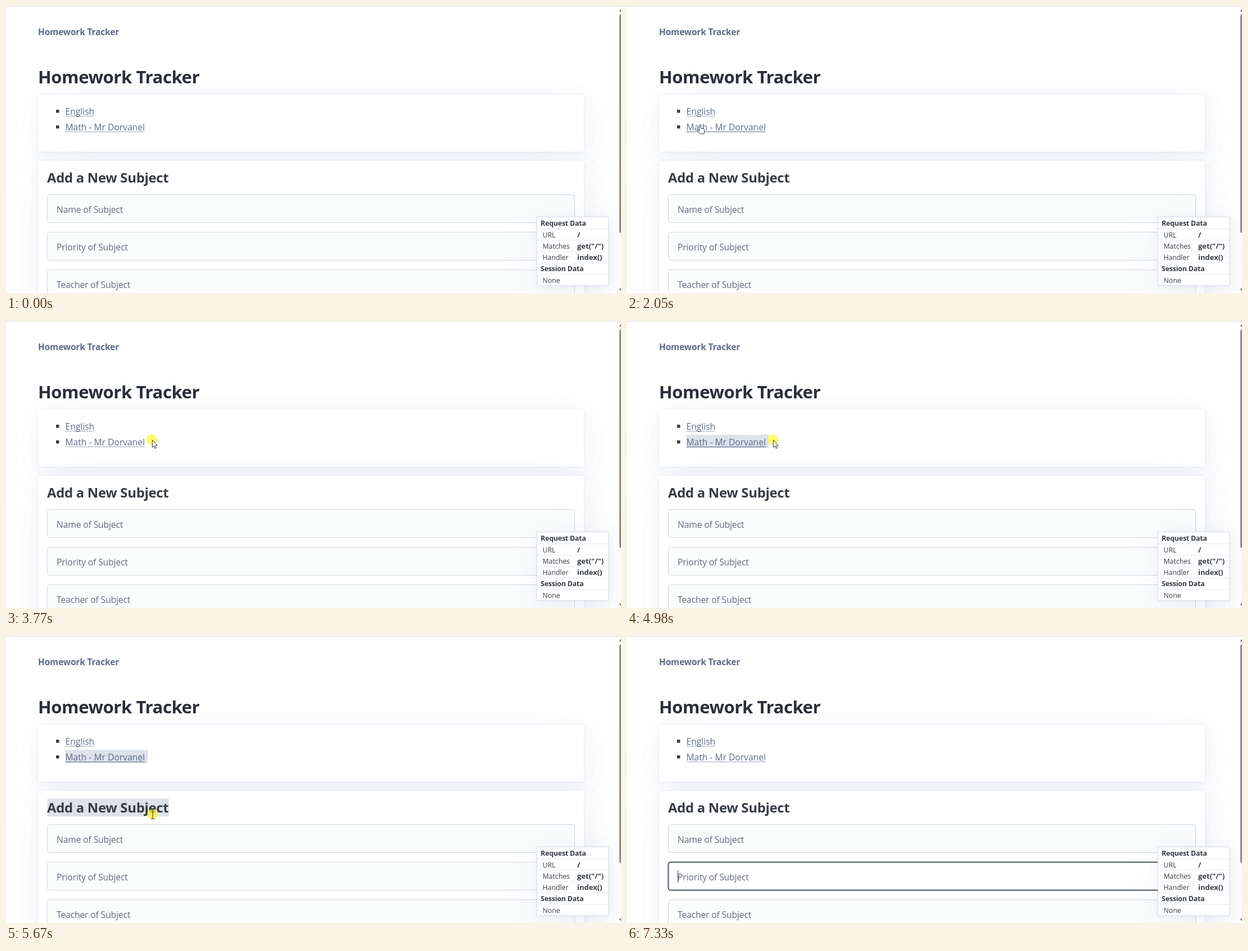
An HTML page for the animation above (7730 ms loop, 1094 by 512 pixels).

```html
<!DOCTYPE html>
<html lang="en">
<head>
<meta charset="utf-8">
<title>Homework Tracker</title>
<style>
html, body { margin: 0; width: 100%; height: 100%; overflow: hidden; background: #fff; }
body { position: relative; }
svg, .card { position: absolute; }
svg { left: 0; top: 0; font-family: "Open Sans", "Noto Sans", sans-serif; fill: #373c44; }
.card { background: #fff; border-radius: 4px; }
.panel { border-radius: 0; box-sizing: border-box; border: 1px solid #dfe3eb; }
.nav { font-size: 15.5px; font-weight: 700; letter-spacing: -.011em; fill: #5d6b89; }
.h1 { font-size: 31px; font-weight: 700; letter-spacing: -.013em; fill: #2a2e39; }
.h2 { font-size: 23.8px; font-weight: 700; letter-spacing: -.01em; }
.link { font-size: 15.6px; fill: #5d6b89; }
.hint { font-size: 15.7px; letter-spacing: -.01em; fill: #646b79; }
.head { font-size: 12.4px; font-weight: 700; letter-spacing: -.015em; }
.key { font-size: 12.3px; }
.val { font-size: 13px; font-weight: 700; }
.field { fill: #fbfcfc; stroke: #cfd5e2; }
.field.focused { fill: #fff; stroke: #48536b; stroke-width: 2; }
.sel { fill: #dde2eb; }
.rule { stroke: #5d6b89; stroke-width: 1.2; }
.row { stroke: #e7eaf0; }
</style>
</head>
<body>
<div class="card" style="left:57px;top:158px;width:971px;height:102px"></div>
<div class="card" style="left:57px;top:276px;width:971px;height:420px"></div>
<svg id="page" width="1094" height="512"></svg>
<div class="card panel" style="left:944px;top:376px;width:128px;height:123px"></div>
<svg id="overlay" width="1094" height="512"></svg>
<script>
const LOOP = 7730, STEP = 70;
const page = document.getElementById('page'), overlay = document.getElementById('overlay');

function add(parent, tag, attrs, text) {
  const el = document.createElementNS('http://www.w3.org/2000/svg', tag);
  for (const name in attrs) el.setAttribute(name, attrs[name]);
  if (text) el.textContent = text;
  parent.appendChild(el);
  return el;
}
const rect = (parent, x, y, width, height, more) =>
  add(parent, 'rect', { x, y, width, height, ...more });
const label = (parent, cls, x, y, text) => add(parent, 'text', { class: cls, x, y }, text);
const line = (parent, x1, x2, y, cls) => add(parent, 'line', { x1, x2, y1: y, y2: y, class: cls });
const show = (el, on) => el.setAttribute('display', on ? 'inline' : 'none');

// Soft shadow: each layer is twice as wide as the one before
const shadow = Array.from({ length: 6 }, (_, i) => {
  const d = 2 ** i / 4;
  return `${d}px ${2 * d}px ${12 * d}px rgba(129,145,181,${.018 + .007 * i})`;
}).concat('0 0 0 1px rgba(129,145,181,.05)').join();
for (const card of document.querySelectorAll('.card')) card.style.boxShadow = shadow;

// Areas that can be selected or hovered
const area = (x, y, w, h) => ({ x, y, w, h });
const areas = {
  title: area(57, 103, 296, 44),
  english: area(105.5, 175, 55.5, 24),
  math: area(105.5, 203, 146.5, 24),
  heading: area(73.5, 290, 216, 32)
};
const fieldAreas = [0, 1, 2].map(i => area(73.5, 336.5 + 67 * i, 938, 50));
const inside = (a, x, y) => x >= a.x && x <= a.x + a.w && y >= a.y && y <= a.y + a.h;

// Page content
rect(page, 0, 0, 1094, 1, { fill: '#dedede' });
const selection = {};
for (const name in areas) {
  const { x, y, w, h } = areas[name];
  selection[name] = rect(page, x, y, w, h, { class: 'sel' });
}
label(page, 'nav', 57, 52, 'Homework Tracker');
label(page, 'h1', 57, 138, 'Homework Tracker');
function link({ x, y, w }, text) {
  rect(page, 89, y + 10, 5.5, 5.5);
  label(page, 'link', x, y + 18.5, text);
  return line(page, x, x + w - 5, y + 21.5, 'rule');
}
const rules = {
  english: link(areas.english, 'English'),
  math: link(areas.math, 'Math - Mr Dorvanel')
};
label(page, 'h2', 73, 315, 'Add a New Subject');
const fields = ['Name', 'Priority', 'Teacher'].map((name, i) => {
  const { x, y, w, h } = fieldAreas[i];
  const box = rect(page, x, y, w, h, { class: 'field', rx: 4 });
  label(page, 'hint', 90, y + 32, name + ' of Subject');
  return box;
});
const caret = rect(page, 90, 418, 1, 22);

// Request panel
[['Request Data'], ['URL', '/'], ['Matches', 'get("/")'], ['Handler', 'index()'],
 ['Session Data'], ['None', '']].forEach(([key, val], i) => {
  const y = 377.3 + i * 20.25, isHead = val === undefined;
  if (i) line(overlay, 945, 1071, y, 'row');
  label(overlay, isHead ? 'head' : 'key', isHead ? 951 : 954.5, y + 15, key);
  if (val) label(overlay, 'val', 1016, y + 15, val);
});

// Scrollbar
rect(overlay, 1091, 15, 8, 390, { rx: 3, fill: '#8b8b8b' });
add(overlay, 'path', { d: 'M1090 10L1095 4V10ZM1090 504H1095V510Z', fill: '#858585' });

// Pointer
const pointer = add(overlay, 'g', {});
const halo = add(pointer, 'circle', { r: 9.5, fill: '#fff52a', 'fill-opacity': .7 });
const shape = (d, fill) => add(pointer, 'path',
  { d, fill, stroke: '#222', 'stroke-width': .9, 'stroke-linejoin': 'round' });
const cursors = {
  arrow: shape('M.3 .3V13.6L3.2 10.9 5.2 15.4 7.2 14.5 5.3 10.2H9.2Z', '#fff'),
  hand: shape('M-1.2 1Q0 -.6 1.2 1V6L7 7.4Q8.4 8 8 10L7 16H0L-4.5 10.5Q-4.8 8.4-1.2 10.4Z', '#fff'),
  beam: shape('M-3 -8H3M0 -8V8M-3 8H3', 'none')
};

// The pointer's trip: each glide goes on from where the last one ended
const APPEAR = 320, LEAVE = 7060, DRAG = 4980, RELEASE = 5740, FOCUS = 6250;
const clicks = [3700, 3970, 4710, 6220], PRESS = 200;
const trip = [];
let last = [952, 446];
function glide(start, end, to, bend) {
  const from = last;
  trip.push({ start, end, from, to, bend: bend || to.map((v, i) => (v + from[i]) / 2) });
  last = to;
}
glide(APPEAR, 680, [797, 356]);
glide(1210, 1280, [632, 264.5]);
glide(1280, 2050, [130, 212], [-170, 185]);
glide(2050, 2540, [177, 181], [125, 190]);
glide(3280, 3630, [260, 212]);
glide(5110, 5670, [261, 318]);
glide(5870, 6220, [310, 428]);
glide(6370, 6790, [1047, 414], [800, 330]);
glide(6920, 6990, [1066, 467]);

function pointerAt(t) {
  const { start, end, from, to, bend } = trip.filter(g => g.start <= t).pop() || trip[0];
  const held = Math.max(0, Math.floor((t - start) / STEP) * STEP);
  const u = Math.min(1, held / (end - start)), v = 1 - u;
  return from.map((p, i) => v * v * p + 2 * u * v * bend[i] + u * u * to[i]);
}

function cursorFor(x, y) {
  const over = a => inside(a, x, y);
  if (over(areas.english) || over(areas.math)) return 'hand';
  return over(areas.heading) || x < 944 && fieldAreas.some(over) ? 'beam' : 'arrow';
}

function render(t) {
  const [x, y] = pointerAt(t), between = (a, b) => t >= a && t < b;
  show(pointer, between(APPEAR, LEAVE));
  pointer.setAttribute('transform', `translate(${x} ${y})`);
  const kind = x > areas.math.x + areas.math.w || y < areas.math.y && x > 161 ? cursorFor(x, y)
    : cursorFor(x, y);
  for (const name in cursors) show(cursors[name], name === kind);
  show(halo, between(DRAG, RELEASE) || clicks.some(c => between(c, c + PRESS)));

  // Dragging over the gap takes in what is above, the heading only once reached
  const dragging = between(DRAG, FOCUS);
  const inGap = dragging && y > 227 && y < areas.heading.y;
  const selected = {
    title: inGap,
    english: inGap || between(3080, clicks[0]),
    math: between(clicks[1], FOCUS),
    heading: dragging && y >= areas.heading.y
  };
  for (const name in selection) show(selection[name], selected[name]);
  for (const name in rules) {
    const strong = selected[name] || inside(areas[name], x, y);
    rules[name].setAttribute('stroke-opacity', strong ? 1 : .6);
  }

  fields[1].classList.toggle('focused', t >= FOCUS);
  show(caret, t >= FOCUS && Math.floor((t - FOCUS) / 540) % 2 === 0);
}

const begin = performance.now();
function tick() {
  render((performance.now() - begin) % LOOP);
  requestAnimationFrame(tick);
}
tick();
</script>
</body>
</html>
```
